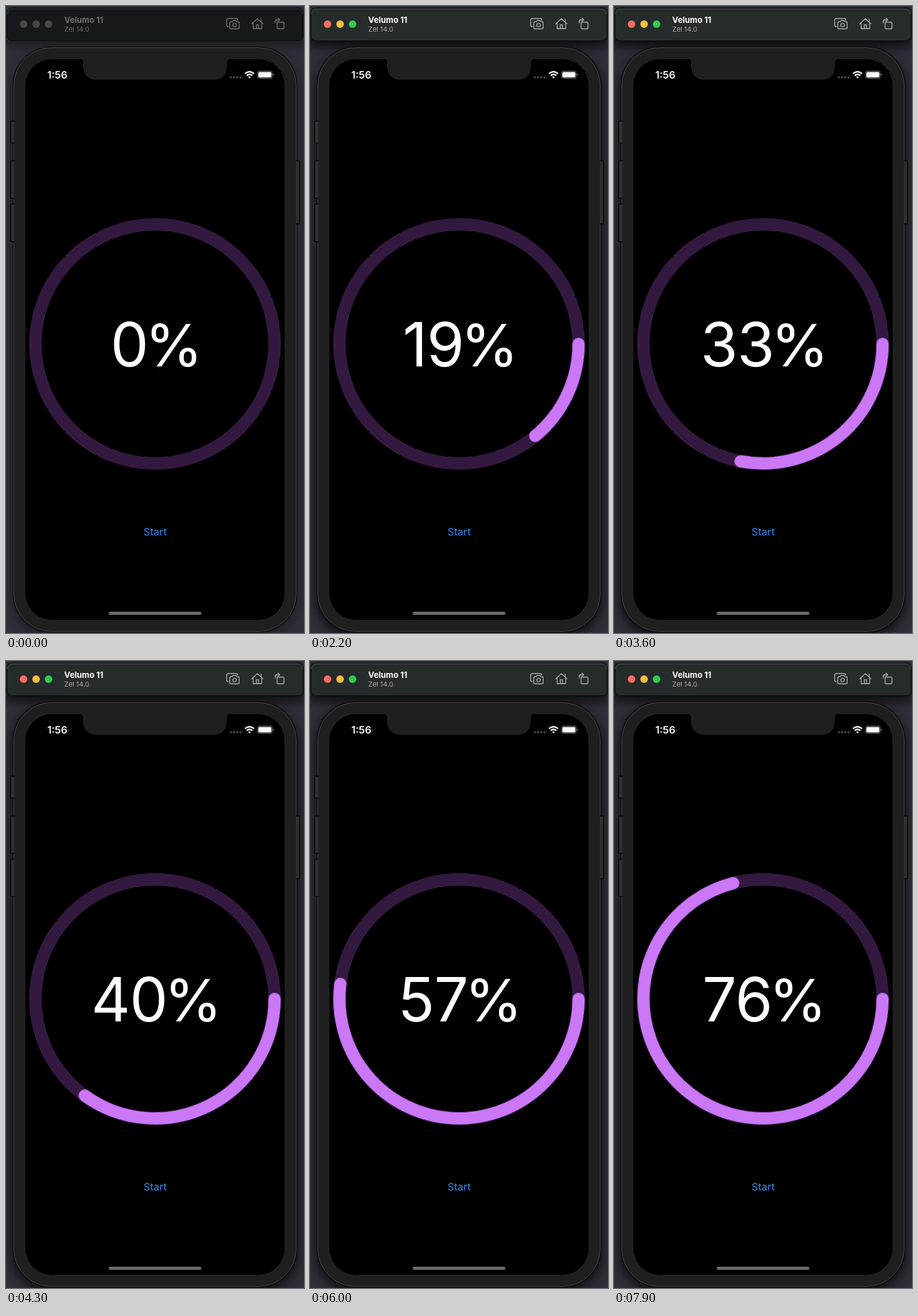
An HTML page that plays this animation: 476x1002 px, repeating every 8000 ms.

```html
<!DOCTYPE html>
<html lang="en">
<head>
<meta charset="utf-8">
<title>Progress ring</title>
<style>
  html, body { margin: 0; width: 100%; height: 100%; overflow: hidden; background: #302f39; }
  svg { display: block; width: 476px; height: 1002px; }
  text { font-family: Inter, Roboto, sans-serif; }
  .line { fill: none; stroke-width: 1.4; stroke-linejoin: round; stroke-linecap: round; }
</style>
</head>
<body>
<svg viewBox="0 0 476 1002">
  <defs>
    <filter id="soft" x="-20%" y="-20%" width="140%" height="140%"><feGaussianBlur stdDeviation="9"/></filter>
  </defs>

  <rect width="476" height="1002" fill="#302f39"/>
  <g id="shade" filter="url(#soft)">
    <rect x="0" y="8" width="476" height="56"/>
    <rect x="10" y="72" width="456" height="935" rx="60"/>
  </g>

  <!-- title bar -->
  <rect id="bar" x="1.5" y="3.5" width="473" height="52" rx="8" stroke="#090a0b"/>
  <path id="rim" d="M2.5 13q0-8.5 8.5-8.5h454q8.5 0 8.5 8.5" fill="none"/>
  <g id="lights">
    <circle cx="28" cy="29" r="6"/><circle cx="48" cy="29" r="6"/><circle cx="68" cy="29" r="6"/>
  </g>
  <text id="name" x="93" y="27" font-size="13" font-weight="700">Velumo 11</text>
  <text id="system" x="93" y="41" font-size="11">Zel 14.0</text>
  <g id="icons" class="line">
    <path d="M355 33q-2.5 0-2.5-2.5v-8q0-2.5 2.5-2.5h12.5q2.5 0 2.5 2.5"/>
    <path d="M359.500 25h2l1.200-1.800h4.600l1.200 1.800h2q2 0 2 2v7.500q0 2-2 2h-11q-2 0-2-2v-7.500q0-2 2-2z"/>
    <circle cx="365" cy="30.5" r="2.9"/>
    <path d="M392.500 28.500l9-8.300 9 8.300M394.700 27v9.300h13.600v-9.300M407.500 25v-4M399.800 36v-6h3.500v6"/>
    <rect x="433" y="25.800" width="11" height="10.700" rx="1.500"/>
    <path d="M430 27v-2.500q0-2.500 2.500-2.500h4.500M434.500 19.300l2.700 2.700-2.700 2.700"/>
  </g>

  <!-- phone -->
  <rect x="12" y="66" width="452" height="934" rx="60.5" fill="#1f1f1f" stroke="#0c0c0c" stroke-width="2"/>
  <rect x="12.5" y="66.5" width="451" height="933" rx="60" fill="#1f1f1f" stroke="#444"/>
  <g fill="#303030" stroke="#080808" stroke-width="1.5">
    <path d="M13.500 184h-4q-2 0-2 2v31q0 2 2 2h4"/>
    <path d="M13.500 247.500h-4q-2 0-2 2v56q0 2 2 2h4"/>
    <path d="M13.500 316.500h-4q-2 0-2 2v56q0 2 2 2h4"/>
    <path d="M463 247.500h4q2 0 2 2v96.500q0 2-2 2h-4"/>
  </g>
  <rect x="31" y="85" width="414" height="896" rx="42"/>
  <path d="M118 84v1q5 0 5 5v5q0 23 23 23h184q23 0 23-23v-5q0-5 5-5v-1z" fill="#1f1f1f"/>

  <!-- status row -->
  <text x="66" y="115.700" font-size="16" font-weight="600" fill="#fff">1:56</text>
  <g fill="#444">
    <circle cx="359.200" cy="113.800" r="1.900"/><circle cx="364.400" cy="113.800" r="1.900"/>
    <circle cx="369.500" cy="113.800" r="1.900"/><circle cx="374.600" cy="113.800" r="1.900"/>
  </g>
  <g fill="none" stroke="#fff" stroke-width="2.2">
    <path d="M381.700 108.200q7.300-6.400 14.600 0M384.400 111.200q4.600-3.900 9.200 0"/>
    <path d="M389 115.800l-2.300-2.500q2.300-1.700 4.600 0z" fill="#fff" stroke="none"/>
  </g>
  <rect x="401.500" y="104" width="24" height="11.800" rx="3.300" fill="none" stroke="#777"/>
  <rect x="403" y="105.500" width="21" height="8.800" rx="2" fill="#fff"/>
  <path d="M426.700 108q1.500.5 1.500 2t-1.500 2z" fill="#777"/>

  <!-- ring -->
  <circle cx="238" cy="540" r="191" fill="none" stroke="#33193f" stroke-width="20"/>
  <g fill="none" stroke-linecap="round">
    <path class="arc" stroke="#8c48ae" stroke-width="20.4"/>
    <path class="arc" stroke="#cb78f6" stroke-width="18.4"/>
  </g>
  <text x="240" y="575.7" font-size="97" letter-spacing="-1" text-anchor="middle" fill="#fff"><tspan id="count">0</tspan><tspan dx="-5" font-size="94">%</tspan></text>
  <text x="238.300" y="846" font-size="16.5" text-anchor="middle" fill="#2f8bf4">Start</text>
  <rect x="164" y="968" width="148" height="5" rx="2.500" fill="#6a6a6a"/>
</svg>
<script>
const LOOP = 8000, TICK = 100, FIRST = 350, EASE = 1000;
const CX = 238, CY = 540, R = 191;
const $ = id => document.getElementById(id);
const arcs = document.querySelectorAll('.arc');
const lights = [...$('lights').children];
const paint = (id, attr, value) => $(id).setAttribute(attr, value);

const smooth = x => {
  x = Math.max(0, Math.min(1, x));
  return x * x * (3 - 2 * x);
};

// Every count adds one percent to the arc, eased over a second.
function ringAt(t, count) {
  let sum = 0;
  for (let k = 0; k < count; k++) sum += smooth((t - FIRST - k * TICK) / EASE);
  return sum / 100;
}

function arcPath(part) {
  const a = part * 2 * Math.PI;
  const x = CX + R * Math.cos(a), y = CY + R * Math.sin(a);
  return `M${CX + R} ${CY}A${R} ${R} 0 ${part > 0.5 ? 1 : 0} 1 ${x.toFixed(3)} ${y.toFixed(3)}`;
}

function setFocus(on) {
  paint('shade', 'opacity', on ? 0.75 : 0.4);
  paint('bar', 'fill', on ? '#262c2b' : '#15191b');
  paint('rim', 'stroke', on ? '#4b504f' : '#34383a');
  paint('name', 'fill', on ? '#fff' : '#6b6e6f');
  paint('system', 'fill', on ? '#a8adac' : '#66696a');
  paint('icons', 'stroke', on ? '#a8adac' : '#6f7374');
  const hues = on ? ['#fe6c61', '#fdbd40', '#32cc50'] : Array(3).fill('#46494a');
  lights.forEach((dot, i) => dot.setAttribute('fill', hues[i]));
}

function draw(ms) {
  const t = Math.floor((ms % LOOP) / TICK) * TICK;
  const count = Math.max(0, Math.floor((t - FIRST) / TICK) + 1);
  const part = ringAt(t, count);
  setFocus(t >= TICK);
  $('count').textContent = count;
  arcs.forEach(arc => arc.setAttribute('d', part > 0 ? arcPath(part) : ''));
}

const start = performance.now();
function frame(now) {
  draw(Math.max(0, now - start));
  requestAnimationFrame(frame);
}
draw(0);
requestAnimationFrame(frame);
</script>
</body>
</html>
```
